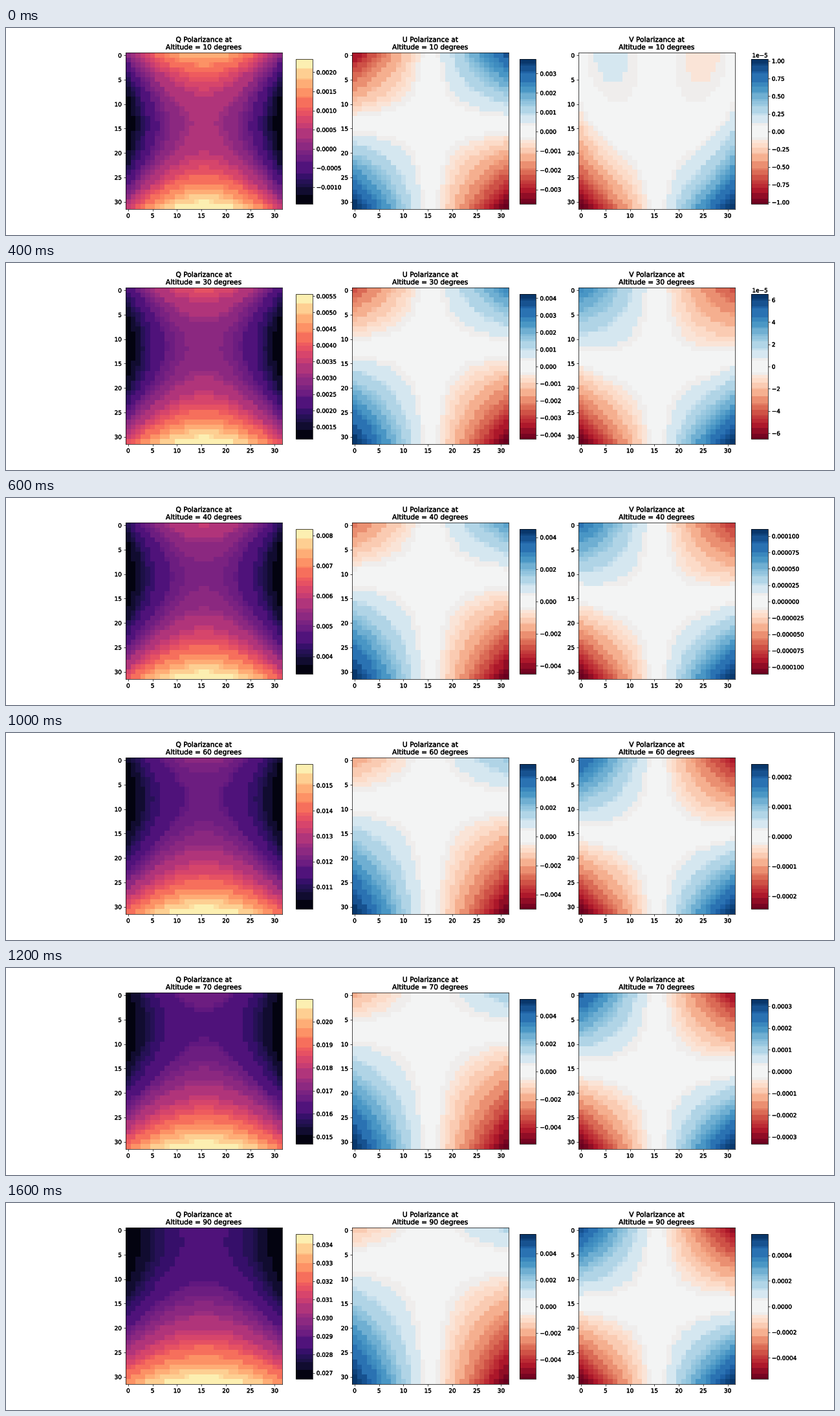
A matplotlib script that plays this animation: 1280x320 px, repeating every 1800 ms.

```python
import numpy as np
import matplotlib.pyplot as plt
from matplotlib import patheffects
from matplotlib.animation import FuncAnimation
from matplotlib.colors import ListedColormap

plt.rcParams["font.family"] = "DejaVu Sans"

N = 32
HALF = (N - 1) / 2
ROW = np.arange(N)[:, None]
X = (np.arange(N)[None, :] - HALF) / HALF
Y = (ROW - HALF) / HALF
ALTITUDES = np.arange(10, 91, 10)

# Sampled extremes of each Stokes term against altitude in degrees
KNOTS = np.array([10, 20, 30, 50, 70, 90]) / 50
Q_MIN = [-0.00144, -0.000486, 0.001134, 0.006394, 0.01469, 0.026664]
Q_MAX = [0.002346, 0.003619, 0.00556, 0.011618, 0.020983, 0.034583]
Q_SADDLE_ROW = [14.2, 12.9, 11.6, 9.2, 6.3, 2.5]
U_MAX = [0.003754, 0.003988, 0.004246, 0.004766, 0.00521, 0.005463]
V_MAX = [1.025e-5, 3.208e-5, 6.508e-5, 1.701e-4, 3.319e-4, 5.653e-4]
U_SLOPE = 0.00344


def curve(values, altitude, degree=4):
    return np.polyval(np.polyfit(KNOTS, values, degree), altitude / 50)


def q_field(altitude):
    low, high = curve(Q_MIN, altitude), curve(Q_MAX, altitude)
    saddle = curve(Q_SADDLE_ROW, altitude)
    reach = (N - 1 - saddle) / HALF
    gain = (high - low) / (1 + reach**2)
    return low + gain * (1 + ((ROW - saddle) / HALF) ** 2 - X**2)


def u_field(altitude):
    offset = 1 - curve(U_MAX, altitude, 3) / U_SLOPE
    return -U_SLOPE * X * (Y - offset)


def v_field(altitude):
    log_fit = np.polyfit(np.log(KNOTS), np.log(V_MAX), 3)
    peak = np.exp(np.polyval(log_fit, np.log(altitude / 50)))
    skew = np.sqrt(V_MAX[0] / peak)
    profile = (1 - 0.48 * skew) * Y + skew * (0.24 * Y**2 + 0.24)
    bend = 0.32 * skew * (1 - ((1 + Y) / 2) ** 4)
    return peak * X * (profile - bend * (1 - X**2))


def posterize(name):
    """Merge neighbouring colours that share the same coarse RGB cell."""
    rgb = plt.get_cmap(name)(np.arange(256))[:, :3]
    cell = rgb * 255 // 32
    steps = np.any(np.diff(cell, axis=0) != 0, axis=1)
    group = np.r_[0, np.cumsum(steps)]
    return np.array([rgb[group == g].mean(axis=0) for g in group])


def diverging():
    colors = posterize("RdBu")
    distance = np.abs(np.linspace(-1, 1, 256))
    colors[distance < 0.12] = np.array([239, 237, 236]) / 255
    colors[distance < 0.075] = np.array([243, 244, 244]) / 255
    return ListedColormap(colors)


def embolden(texts):
    for text in texts:
        text.set_path_effects([patheffects.withStroke(linewidth=0.4, foreground="black")])


MAGMA = ListedColormap(posterize("magma"))
RDBU = diverging()
PANELS = [
    ("Q", q_field, MAGMA, 0.35),
    ("U", u_field, RDBU, 0.62),
    ("V", v_field, RDBU, 0.90),
]

fig, axes = plt.subplots(1, 3, figsize=(20, 5), dpi=64)
fig.subplots_adjust(left=0.125, right=0.9, bottom=0.125, top=0.88, wspace=0.2)

images, bars = [], []
for ax, (_, field, cmap, left) in zip(axes, PANELS):
    image = ax.imshow(field(ALTITUDES[0]), cmap=cmap, interpolation="nearest")
    bars.append(fig.colorbar(image, cax=fig.add_axes([left, 0.15, 0.02, 0.7])))
    images.append(image)
    embolden(ax.get_xticklabels() + ax.get_yticklabels())


def update(index):
    altitude = ALTITUDES[index]
    for ax, image, bar, (name, field, _, _) in zip(axes, images, bars, PANELS):
        image.set_data(field(altitude))
        image.autoscale()
        title = ax.set_title(f"{name} Polarizance at\nAltitude = {altitude} degrees")
        bar_axis = bar.ax.yaxis
        embolden([title, bar_axis.get_offset_text(), *bar_axis.get_ticklabels()])
    return images


anim = FuncAnimation(fig, update, frames=len(ALTITUDES), interval=200, repeat=True)
plt.show()
```
